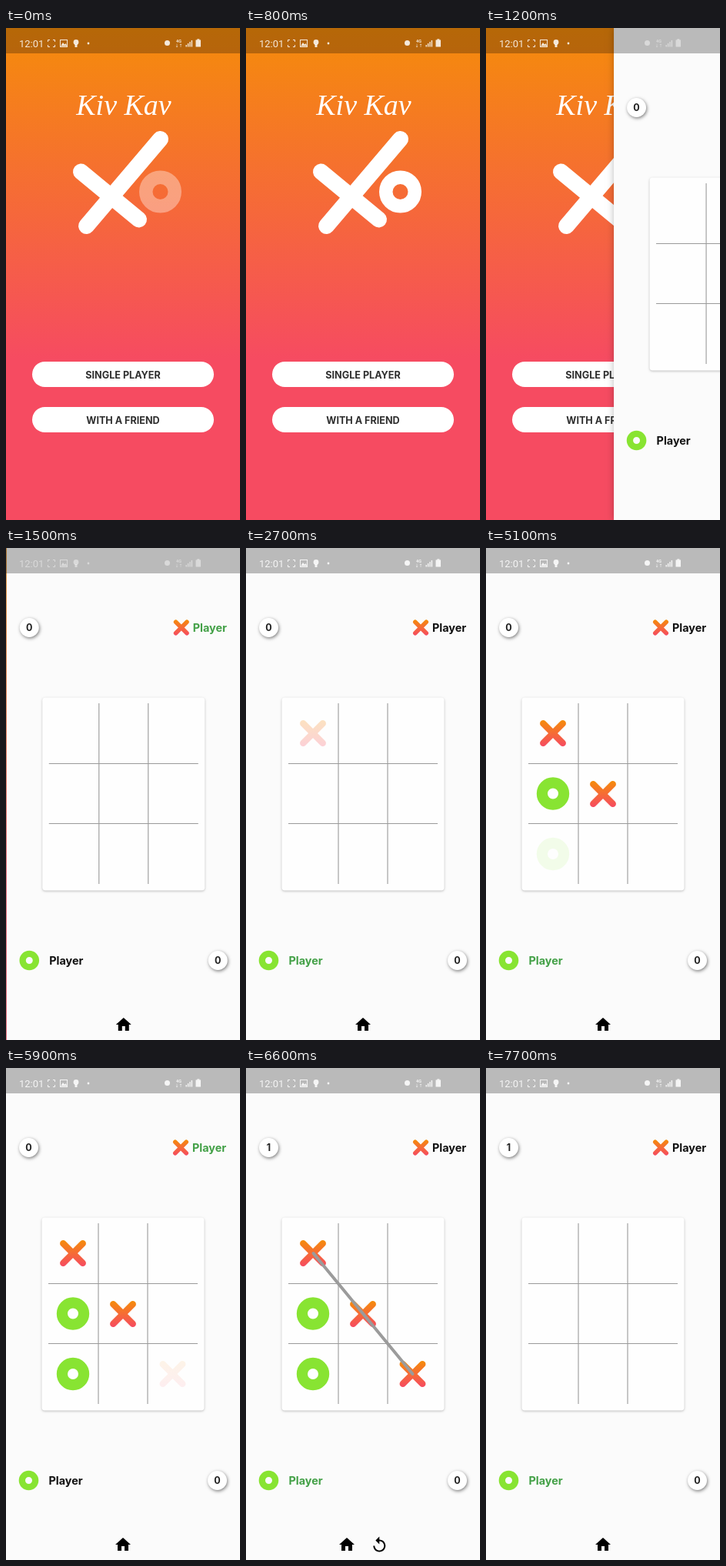
Write an HTML page with a canvas that moves like this. It is 304 px wide and 640 px high and loops after 8000 ms.

```html
<!DOCTYPE html>
<html lang="en">
<head>
<meta charset="utf-8">
<title>Noughts and crosses</title>
<style>
html, body { margin: 0; width: 100%; height: 100%; overflow: hidden; background: #fbfbfb; }
canvas { display: block; width: 304px; height: 640px; }
</style>
</head>
<body>
<canvas id="stage" width="304" height="640"></canvas>
<script>
const g = document.getElementById('stage').getContext('2d');
const W = 304, H = 640, LOOP = 8000;
const ORANGE = '#f58c0a', PINK = '#f64b61', LIME = '#88e432', TURN = '#43a047';
const SANS = 'Inter, "Open Sans", sans-serif';
const SLIDE = { start: 1035, length: 500 };
const WIN = 6000, RESET = 7200, LABEL_LAG = 130;
const MOVES = [
  { mark: 'x', x: 87, y: 241, at: 2560 },
  { mark: 'o', x: 87, y: 319.5, at: 3140 },
  { mark: 'x', x: 152, y: 320, at: 4250 },
  { mark: 'o', x: 87, y: 398, at: 5030 },
  { mark: 'x', x: 216.5, y: 398, at: 5850 }
];
const FADE = { x: 560, o: 700 };
const HOME = new Path2D('M10 20v-6h4v6h5v-8h3L12 3 2 12h3v8z');
const REPLAY = new Path2D('M12 5V1L7 6l5 5V7c3.31 0 6 2.69 6 6s-2.69 6-6 6-6-2.69-6-6H4c0 4.42 3.58 8 8 8s8-3.58 8-8-3.58-8-8-8z');

const clamp = v => Math.max(0, Math.min(1, v));
const progress = (t, start, length) => clamp((t - start) / length);

// Cubic bezier (.4, 0, .2, 1), solved by bisection
function ease(p) {
  let lo = 0, hi = 1;
  for (let i = 0; i < 20; i++) {
    const u = (lo + hi) / 2, v = 1 - u;
    if (1.2 * v * v * u + 0.6 * v * u * u + u * u * u < p) lo = u; else hi = u;
  }
  return 3 * (1 - lo) * lo * lo + lo ** 3;
}

function fade(y0, y1) {
  const grad = g.createLinearGradient(0, y0, 0, y1);
  grad.addColorStop(0, ORANGE);
  grad.addColorStop(1, PINK);
  return grad;
}

function line(x0, y0, x1, y1, width, color, cap = 'round') {
  g.lineWidth = width;
  g.strokeStyle = color;
  g.lineCap = cap;
  g.beginPath();
  g.moveTo(x0, y0);
  g.lineTo(x1, y1);
  g.stroke();
}

function box(x, y, w, h, r, color) {
  g.fillStyle = color;
  g.beginPath();
  g.roundRect(x, y, w, h, r);
  g.fill();
}

function disc(x, y, r, color) {
  g.fillStyle = color;
  g.beginPath();
  g.arc(x, y, r, 0, 7);
  g.fill();
}

function ring(x, y, outer, inner, color) {
  g.lineWidth = outer - inner;
  g.strokeStyle = color;
  g.beginPath();
  g.arc(x, y, (outer + inner) / 2, 0, 7);
  g.stroke();
}

function cross(x, y, arm, width) {
  const reach = arm + width / 2, paint = fade(y - reach, y + reach);
  g.lineWidth = width;
  g.strokeStyle = paint;
  g.lineCap = 'round';
  g.beginPath();
  g.moveTo(x - arm, y - arm);
  g.lineTo(x + arm, y + arm);
  g.moveTo(x + arm, y - arm);
  g.lineTo(x - arm, y + arm);
  g.stroke();
}

function text(str, x, y, font, color, align = 'left') {
  g.font = font;
  g.fillStyle = color;
  g.textAlign = align;
  g.fillText(str, x, y);
}

function shadow(blur, dx, dy, alpha, draw) {
  g.save();
  g.shadowColor = `rgba(0,0,0,${alpha})`;
  g.shadowBlur = blur;
  g.shadowOffsetX = dx;
  g.shadowOffsetY = dy;
  draw();
  g.restore();
}

function icon(path, x, y) {
  g.save();
  g.translate(x, y);
  g.fillStyle = '#000';
  g.fill(path);
  g.restore();
}

function menu(t) {
  g.fillStyle = fade(0, 430);
  g.fillRect(0, 0, W, H);
  text('Kiv Kav', 153, 113, 'italic 38px "Liberation Serif", "Noto Serif", serif', '#fff', 'center');
  line(200.5, 144.5, 104.5, 257.5, 21, '#fff');
  line(97.5, 187, 172.5, 249, 21, '#fff');
  g.globalAlpha = clamp(0.36 + t / 700);
  ring(200.5, 213, 27.5, 10, '#fff');
  g.globalAlpha = 1;
  [['SINGLE PLAYER', 434], ['WITH A FRIEND', 493]].forEach(([label, y]) => {
    box(34, y, 236, 33, 16.5, '#fff');
    text(label, 152, y + 21.5, '700 12.6px ' + SANS, '#2e2e2e', 'center');
  });
}

function score(n, x, y) {
  shadow(4, 1, 1.5, 0.5, () => disc(x, y, 12.5, '#fff'));
  text(n, x, y + 4.5, '700 12.5px ' + SANS, '#222', 'center');
}

function board(t) {
  shadow(3, 0, 1, 0.25, () => box(46.5, 194.5, 211, 251, 4, '#fefefe'));
  for (const x of [120, 184]) line(x, 202, x, 437, 1.2, '#a2a2a2', 'butt');
  for (const y of [280.5, 358.5]) line(55, y, 249, y, 1, '#9a9a9a', 'butt');
  if (t >= RESET) return;
  for (const m of MOVES) {
    g.globalAlpha = progress(t, m.at, FADE[m.mark]);
    if (m.mark === 'x') cross(m.x, m.y, 12.7, 8.5);
    else ring(m.x, m.y, 21.2, 7, LIME);
  }
  g.globalAlpha = 1;
  const p = ease(progress(t, WIN, 520));
  if (p > 0) line(87.5, 241, 87.5 + 129 * p, 241 + 157 * p, 4, '#9b9b9b');
}

function game(t) {
  shadow(8, -1, 0, 0.22, () => {
    g.fillStyle = '#fbfbfb';
    g.fillRect(0, 0, W + 10, H);
  });
  const turns = MOVES.filter(m => t >= m.at + LABEL_LAG).length;
  const xTurn = turns % 2 === 0;
  const label = '700 14.4px ' + SANS;
  score(t >= WIN ? '1' : '0', 29.5, 103.5);
  cross(227, 103.5, 7.2, 5.6);
  text('Player', 242, 108.5, label, xTurn ? TURN : '#111');
  ring(29.5, 536.5, 12.8, 4.5, LIME);
  text('Player', 55.5, 541.7, label, xTurn ? '#111' : TURN);
  score('0', 274.5, 536.5);
  board(t);
  const over = t >= WIN && t < RESET;
  icon(HOME, over ? 119 : 140, 608);
  if (over) icon(REPLAY, 161.3, 608.5);
}

function statusBar(t) {
  g.fillStyle = 'rgba(0,0,0,.26)';
  g.fillRect(0, 0, W, 33);
  const dim = (from, to) => 0.85 - 0.4 * progress(t, from, 100) + 0.4 * progress(t, to, 200);
  const ink = '#fff';

  g.globalAlpha = dim(1380, 1650);
  text('12:01', 17, 24.5, '13px Roboto, sans-serif', ink);
  g.strokeStyle = ink;
  g.lineWidth = 1;
  g.lineCap = 'butt';
  g.beginPath();
  for (const sx of [-1, 1]) for (const sy of [-1, 1]) {
    g.moveTo(59 + sx * 4.5, 20 + sy * 2);
    g.lineTo(59 + sx * 4.5, 20 + sy * 4.5);
    g.lineTo(59 + sx * 2, 20 + sy * 4.5);
  }
  g.stroke();
  g.strokeRect(70.5, 15.5, 9, 9);
  g.fillStyle = ink;
  g.beginPath();
  g.moveTo(71, 23.5);
  g.lineTo(74, 19);
  g.lineTo(76, 21.5);
  g.lineTo(77.5, 20);
  g.lineTo(79.5, 23.5);
  g.fill();
  disc(91, 18.5, 3.4, ink);
  g.fillRect(89.5, 21, 3, 4);
  disc(107, 20, 1.4, ink);

  g.globalAlpha = dim(1100, 1650);
  disc(209.5, 19.5, 3.5, ink);
  text('4G', 224.5, 18.5, '700 5.5px Roboto, sans-serif', ink, 'center');
  text('↓↑', 224.5, 25, '6px "DejaVu Sans", sans-serif', ink, 'center');
  for (let i = 0; i < 4; i++) g.fillRect(233.5 + i * 2.4, 22 - i * 2, 1.4, 2.5 + i * 2);
  g.fillRect(246.5, 15.5, 6.5, 9);
  g.fillRect(248.3, 14.3, 3, 1.5);
  g.globalAlpha = 1;
}

function draw(t) {
  const shift = W * (1 - ease(progress(t, SLIDE.start, SLIDE.length)));
  menu(t);
  if (t > SLIDE.start) {
    g.save();
    g.translate(shift, 0);
    game(t);
    g.restore();
  }
  statusBar(t);
}

const begin = performance.now();
function tick() {
  draw((performance.now() - begin) % LOOP);
  requestAnimationFrame(tick);
}
tick();
</script>
</body>
</html>
```
